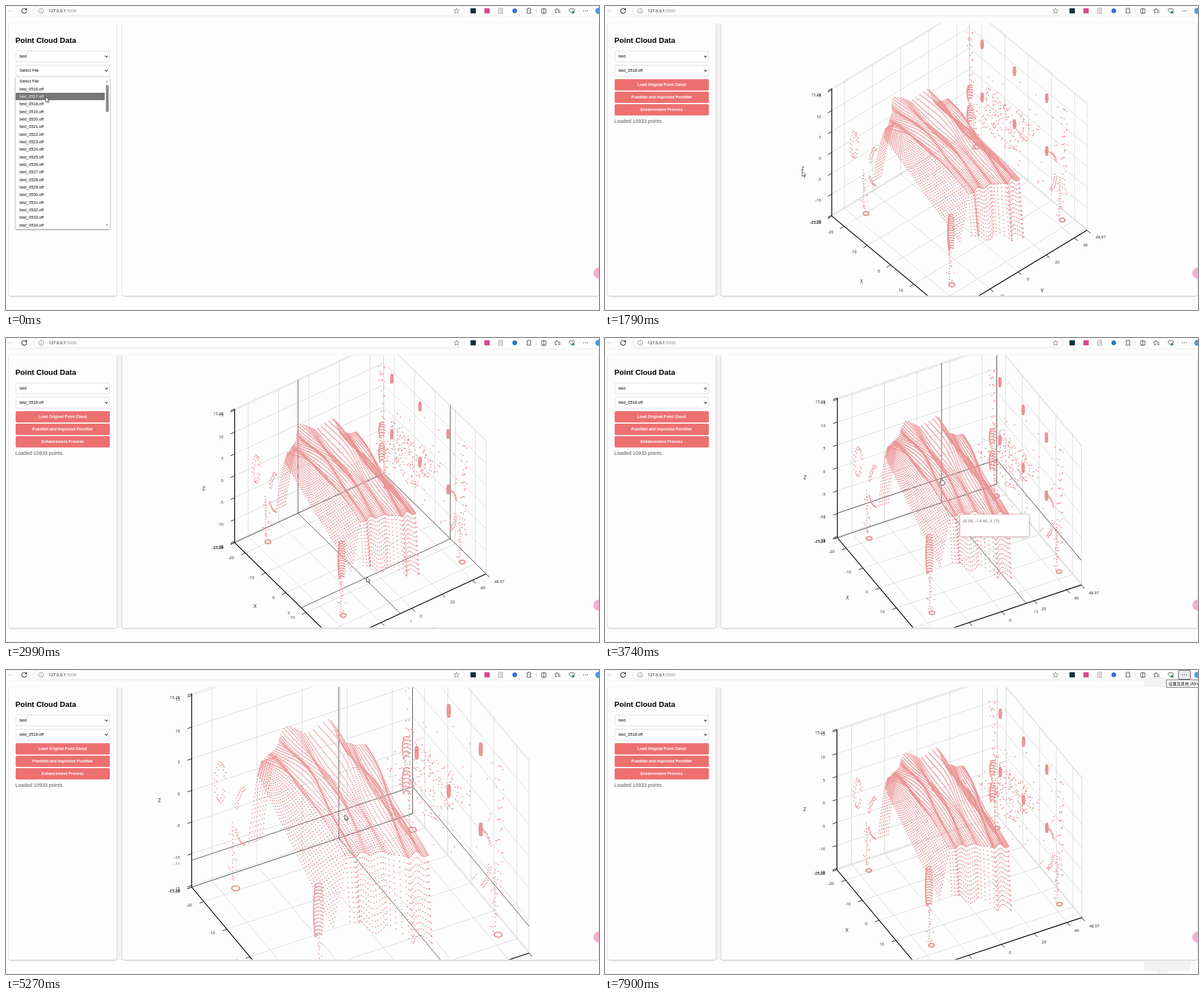
Write an HTML page with a canvas that moves like this. It is 1045 px wide and 536 px high and loops after 8.18 s.

```html
<!DOCTYPE html>
<html lang="en">
<head>
<meta charset="utf-8">
<title>Point Cloud Data</title>
<style>
html, body { margin: 0; width: 100%; height: 100%; overflow: hidden; background: #fdfdfd; }
body { position: relative; font: 7.25px "Liberation Sans", Arial, sans-serif; color: #000; }
body > *, #menu > * { position: absolute; box-sizing: border-box; }
#bar { left: 0; top: 0; }
.url { left: 75px; top: 2px; font: 7.25px/13px "Open Sans", sans-serif; }
.url span { color: #777; }
.panel { top: 30px; height: 481px; border-radius: 4px; background: #fdfdfd; box-shadow: 0 1px 3px rgba(0,0,0,.27); }
#gap { left: 195px; top: 30px; width: 10px; height: 481px; background: #f3f3f3; }
h2 { left: 16.5px; top: 52px; margin: 0; font-size: 13.3px; line-height: 17px; white-space: nowrap; }
.select { left: 16.5px; width: 166.5px; height: 19.5px; border: 1px solid #ddd; border-radius: 2px; padding-left: 6.5px; line-height: 18px; background: #fff; }
.select::after { content: ""; position: absolute; right: 3px; top: 5.5px; width: 3px; height: 3px; border: solid #111; border-width: 0 1.2px 1.2px 0; transform: rotate(45deg); }
.button { left: 16.5px; width: 166.5px; height: 19.5px; border-radius: 2.5px; background: #ed7071; color: #fff; text-align: center; font-weight: bold; font-size: 6.95px; line-height: 19.5px; }
.button.hover { background: #f1babb; }
#loaded { left: 16.5px; top: 197px; font-size: 8.89px; line-height: 12px; color: #555; }
#menu { left: 16.5px; top: 126px; width: 166.5px; height: 267px; background: #fff; box-shadow: 0 1px 3px rgba(0,0,0,.5); }
#menu div { left: 0; width: 157.5px; height: 13.3px; padding-left: 7.5px; line-height: 13.8px; }
#menu .on { background: #767676; color: #fff; }
#menu i { left: 159.5px; top: 13px; width: 5px; height: 48px; border-radius: 2.5px; background: #8b8b8b; }
#menu b { left: 159.5px; border: 2.5px solid transparent; }
#stage { left: 0; top: 0; }
#bubble { left: 1035px; top: 461px; width: 20px; height: 20px; border-radius: 50%; background: #f6aed0; }
.ghost { background: #f2f2f2; }
#hint { left: 989px; top: 17px; width: 70px; height: 14px; border: 1px solid #666; background: #fff; padding-left: 3px; font: 7.2px/12px "Noto Sans CJK SC", "Noto Sans CJK", sans-serif; white-space: nowrap; }
#dots { left: 1010px; top: 0; width: 22px; height: 17px; border: 1px solid #556; border-radius: 2px; background: #e9e9ec; }
#cursor { left: 0; top: 0; overflow: visible; }
</style>
</head>
<body>
<div id="dots"></div>
<svg id="bar" width="1045" height="22" fill="none" stroke="#333" stroke-width=".9">
  <path d="M0 19.5H1045" stroke="#ececec"/>
  <rect x="48.5" y="-.5" width="759" height="17.5" rx="8.7" stroke="#dcdcdc"/>
  <path d="M13 8.5H4M7.5 5L4 8.5L7.5 12" stroke="#ccc"/>
  <path d="M35.6 6.2A4.3 4.3 0 1 0 36.3 8.6M36.3 3.6V6.6H33.3" stroke-width="1.1"/>
  <circle cx="62" cy="8.5" r="4.3" stroke="#777"/><path d="M62 8V11M62 6V6.8" stroke="#777"/>
  <path d="M794 4l1.4 2.9 3.2.4-2.3 2.2.6 3.2-2.9-1.5-2.9 1.5.6-3.2-2.3-2.2 3.2-.4z" stroke="#777"/>
  <g stroke="none">
    <rect x="818.5" y="4" width="9.5" height="9" rx="1" fill="#123038"/>
    <rect x="843" y="4" width="9.5" height="9" rx="1" fill="#d9488b"/>
    <circle cx="896.5" cy="8.5" r="4.2" fill="#2b74d4"/>
    <circle cx="1044" cy="8.5" r="5.5" fill="#4a9ede"/>
  </g>
  <path d="M869 4h6v9h-7V5zM869.5 7h4.5M869.5 10h4.5" stroke="#888"/>
  <path d="M918 5h2.2a1.5 1.5 0 0 1 3 0h1.8v2.3a1.5 1.5 0 0 0 0 3V12.5H918V10.3a1.5 1.5 0 0 0 0-3z"/>
  <path d="M934.5 4V13" stroke="#ddd"/>
  <path d="M944 5h7.5v7.5H944zM947.8 3.5V14"/>
  <path d="M971 4l1.4 2.7 3 .4M971 4l-1.3 2.8-3 .4 2.2 2.1-.5 3.1 2.6-1.4M973 9h4M973 11.5h4"/>
  <path d="M997 12.5l-4-4a2.4 2.4 0 0 1 4-3 2.4 2.4 0 0 1 4 3z"/>
  <circle cx="999.5" cy="11" r="2.3" fill="#2e8b45" stroke="none"/>
  <path d="M1017.5 8.5h.1M1021 8.5h.1M1024.5 8.5h.1" stroke-width="1.5" stroke-linecap="round"/>
</svg>
<div class="url">127.0.0.1<span>:5000</span></div>
<div id="gap"></div>
<div class="panel" style="left:5px;width:189.5px"></div>
<div class="panel" style="left:204.5px;width:839px"></div>
<h2>Point Cloud Data</h2>
<div class="select" style="top:79.3px">bed</div>
<div class="select" style="top:104.2px" id="file">Select File</div>
<div class="button" style="top:129px" id="load">Load Original Point Cloud</div>
<div class="button" style="top:151.2px">PointNet and Improved PointNet</div>
<div class="button" style="top:173.3px">Enhancement Process</div>
<div id="loaded">Loaded 10933 points.</div>
<div id="menu"><i></i><b style="top:3.5px;border-bottom-color:#666"></b><b style="top:259px;border-top-color:#666"></b></div>
<canvas id="stage" width="1045" height="536"></canvas>
<div id="bubble"></div>
<div class="ghost late" style="left:950px;top:13px;width:40px;height:16px"></div>
<div class="ghost late" style="left:950px;top:514px;width:82px;height:17px"></div>
<div class="ghost late" style="left:973px;top:531px;width:18px;height:5px"></div>
<div id="hint" class="late">设置及其他 (Alt+F)</div>
<svg id="cursor" width="12" height="16" fill="#fff" stroke="#222" stroke-width=".8" stroke-linejoin="round">
  <path id="arrow" d="M0 0V9.5L2.2 7.5L3.7 10.8L5.2 10.1L3.7 7H6.6Z"/>
  <path id="hand" d="M-1 .8Q0-.6 1 .8V4.5L5.2 5.6Q6.2 6 6 7.5L5 12H-.5L-3.6 7.7Q-3.6 6.3-2.2 7L-1 8Z"/>
</svg>
<script>
const LOOP = 8180, CX = 624.5, CY = 270.5;
const REST = 319, LAG = 60;
const RANGE = { x: 50.52, y: 97.94, z: 30.56 };
const $ = id => document.getElementById(id);
const ctx = $('stage').getContext('2d');
const late = document.querySelectorAll('.late');
const mix = (a, b, k) => a + (b - a) * k;

const rows = ['Select File', ...Array.from({ length: 19 }, (_, i) => `bed_0${516 + i}.off`)].map((name, i) => {
  const row = document.createElement('div');
  row.textContent = name;
  row.style.top = i * 13.33 + .3 + 'px';
  return $('menu').appendChild(row);
});

// Values between rows of [key, ...values], linear.
function track(keys, t) {
  const i = keys.findIndex(k => k[0] > t);
  if (i < 0) return keys[keys.length - 1].slice(1);
  if (!i) return keys[0].slice(1);
  const a = keys[i - 1], b = keys[i], k = (t - a[0]) / (b[0] - a[0]);
  return a.slice(1).map((v, n) => mix(v, b[n + 1], k));
}

// start, interval, end of each stepped stretch
const STEPS = [[0, 150, 150], [550, 135, 820], [1250, 133, 2180], [2330, 137, 3290], [3440, 150, 4400],
  [4520, 120, 5390], [5700, 183, 6250], [6870, 147, 7900]];
function hold(t) {
  const [start, every, end] = STEPS.filter(s => s[0] <= t).pop();
  return t >= end ? end : start + Math.floor((t - start) / every) * every;
}
const MOUSE = [[0, 70, 160], [150, 71, 172], [550, 72, 172], [820, 92, 140], [1250, 92, 140], [1500, 200, 200],
  [2270, 603, 449], [2330, 603, 449], [3290, 660, 400], [3680, 593, 247], [3740, 593, 247], [4400, 597, 255],
  [5640, 597, 255], [6250, 669, 285], [6870, 690, 250], [7600, 1010, 20], [7900, 1021, 8]];
// time, size, turn, tilt
const VIEW = [[2330, 319, 49.5, 45.2], [3290, 318.5, 60, 40.2], [3440, 318, 62, 39.2], [4400, 318, 62, 39.2],
  [4520, 390, 62, 39.2], [4760, 550, 62.2, 39.2], [4880, 597, 62.2, 39.2], [5000, 560, 62.2, 39.2],
  [5360, 380, 62.2, 39.2], [5700, 372, 62.2, 39.2], [6060, 319.5, 62.2, 39.2]];

function makeCloud() {
  const cloud = [], add = (u, v, w) => cloud.push([u, v, w]);
  let seed = 17;
  const rnd = () => (seed = seed * 16807 % 2147483647) / 2147483647;
  const jit = r => (rnd() - .5) * 2 * r;
  const grid = (n, m, f) => {
    for (let i = 0; i < n; i++) for (let j = 0; j < m; j++) f(i / (n - 1), j / (m - 1));
  };
  // blanket edges: position, v and u and w at one side, v and w at the other
  const EDGE = [[0, -.31, -.25, .26, -.27, .2], [.2, -.2, -.34, .22, -.2, .2], [.38, -.12, -.42, .245, -.15, .19],
    [.5, -.07, -.33, .25, -.08, .15], [.6, 0, -.27, .34, -.01, .12], [.72, .07, -.28, .19, .03, .11],
    [1, .2, -.33, .08, .1, .08]];
  const top = (a, b) => {
    const [v0, u0, w0, v1, w1] = track(EDGE, a), arch = Math.sin(b * Math.PI);
    const fold = (Math.sin(a * 34 + b * 6) * .01 + Math.sin(a * 15 - b * 5) * .009) * (.35 + .65 * arch);
    return [mix(u0, .39 + .012 * Math.sin(a * 22), b), mix(v0, v1, b) + fold,
      mix(w0, w1, b) + .11 * (1 - a) ** 1.7 * arch + fold * 1.2];
  };
  grid(50, 72, (a, b) => add(...top(a, b)));
  grid(50, 15, (b, k) => {
    const [u, v, w] = top(0, b);
    add(u, mix(v, -.33, k), mix(w, .068 - .5 * u, k));
  });
  grid(36, 14, (a, k) => {
    const [u, v, w] = top(a, 1);
    add(u + .03 * k + .012 * Math.sin(a * 22) * k, v, mix(w, -.08 - .67 * (v + .3), k) + .02 * Math.sin(a * 16) * k);
  });
  grid(6, 26, (a, k) => add(mix(-.25, -.37, k), mix(-.31, -.25, a), .26 - .51 * k ** 1.5));

  // upright circle in the v-w plane, a few points thick
  const hoop = (c, n, rv, rw, from, to) => {
    for (let i = 0; i < n; i++) {
      const g = mix(from, to, i / (n - 1)) * Math.PI / 180;
      for (const d of [-.012, .004]) add(c[0] + d + jit(.004), c[1] + rv * Math.cos(g), c[2] + rw * Math.sin(g));
    }
  };
  const ring = (u, v, w, n, r, from = 0, to = 360) => {
    for (let i = 0; i < n; i++) {
      const g = mix(from, to, i / n) * Math.PI / 180;
      add(u + r * Math.cos(g), v + r * Math.sin(g), w);
    }
  };
  const stack = (u, v, w, height, radius, levels, to) => {
    for (let i = 0; i < levels; i++) {
      const k = i / (levels - 1) * 2 - 1;
      ring(u, v, w + k * height, 12, radius * (1 - .3 * k * k), 90, 90 + to);
    }
  };
  for (const [u, v, w] of [[-.347, -.382, -.44], [.365, -.366, -.465], [.377, .425, -.465], [-.35, .42, -.445]]) {
    ring(u, v, w, 36, .0155);
    for (let i = 0; i < 15; i++) {
      const h = w + .04 + i * .021;
      add(u - .01 + jit(.003), v - .008, h);
      if (i % 3 == 0) for (let j = 0; j < 3; j++) add(u + jit(.022), v - .01 + jit(.016), h + jit(.008));
    }
  }
  for (const u of [-.4, .4]) for (let i = 0; i < 13; i++) {
    const h = .42 - i * .055;
    for (let j = 0; j < 4; j++) if (rnd() < .75) add(u + jit(.016), .42 + jit(.014), h + jit(.008));
  }
  hoop([-.39, -.426, .09], 17, .022, .1, 10, 330);
  stack(.4, -.4, -.01, .13, .021, 15, 200);
  stack(-.4, .42, -.06, .05, .018, 6, 200);
  stack(-.4, .42, -.23, .06, .018, 7, 200);
  for (const [c, mid] of [[[-.261, -.381, -.006], 180], [[.351, .362, -.068], 0]])
    for (const s of [-1, 1]) hoop(c, 11, .045, .145, mid + 22 * s, mid + 85 * s);
  for (const u of [-.275, 0, .275]) for (const w of [.43, .015]) stack(u, .4, w, .029, .0065, 9, 360);
  // loose pillow points between four corners
  const L = [-.11, .16, .167], T = [-.055, .268, .351], R = [.256, .374, .19], B = [.197, .217, .047];
  for (let i = 0; i < 200; i++) {
    const a = rnd(), b = rnd();
    add(...L.map((_, n) => mix(mix(L[n], T[n], a), mix(B[n], R[n], a), b) + jit(.012)));
  }
  for (let i = 0; i < 34; i++) add(jit(.38), .4 + jit(.02), jit(.42));
  return cloud;
}
const cloud = makeCloud();

function drawChart(t) {
  const [size, turn, tilt] = track(VIEW, t), rad = Math.PI / 180;
  const cos = Math.cos(turn * rad), sin = Math.sin(turn * rad);
  const s = Math.sin(tilt * rad), c = Math.cos(tilt * rad);
  const at = (u, v, w) => [CX + size * (u * cos + v * sin), CY + size * ((u * sin - v * cos) * s - w * c)];
  const line = (p, q, color, width) => {
    ctx.strokeStyle = color;
    ctx.lineWidth = width;
    ctx.beginPath();
    ctx.moveTo(...at(...p));
    ctx.lineTo(...at(...q));
    ctx.stroke();
  };
  const planes = (axis, k, color, width) => {
    if (axis == 'x') {
      line([k, -.5, -.5], [k, .5, -.5], color, width);
      line([k, .5, -.5], [k, .5, .5], color, width);
    } else if (axis == 'y') {
      line([-.5, k, -.5], [.5, k, -.5], color, width);
      line([-.5, k, -.5], [-.5, k, .5], color, width);
    } else {
      line([-.5, -.5, k], [-.5, .5, k], color, width);
      line([-.5, .5, k], [.5, .5, k], color, width);
    }
  };
  const unit = (x, y) => [x / Math.hypot(x, y), y / Math.hypot(x, y)];
  const back = unit(-sin, cos * s), right = unit(cos, sin * s);
  const foot = (axis, k) => axis == 'x' ? at(k, -.5, -.5) : axis == 'y' ? at(.5, k, -.5) : at(-.5, -.5, k);
  const label = (axis, k, text, color) => {
    const [x, y] = foot(axis, k), d = axis == 'y' ? right : back, far = axis == 'y' ? 20 : 22;
    ctx.fillStyle = color;
    ctx.textAlign = axis == 'y' ? 'left' : 'right';
    ctx.fillText(text, x + d[0] * far, y + d[1] * far);
  };

  ctx.save();
  ctx.beginPath();
  ctx.rect(205, 30.5, 839, 480);
  ctx.clip();
  ctx.font = '7px "Open Sans", sans-serif';
  ctx.textBaseline = 'middle';
  const ticks = { x: [-20, -10, 0, 10, 20], y: [-40, -20, 0, 20, 40], z: [-15, -10, -5, 0, 5, 10, 15] };
  const ends = { x: 25.26, y: 48.97, z: 15.28 };
  for (const axis in ticks)
    for (const v of [-ends[axis], ...ticks[axis], ends[axis]]) planes(axis, v / RANGE[axis], '#cfcfcf', .8);

  // the pointer lies on the back face under the mouse; it trails a little and ignores zooming
  const [mx, my] = track(MOUSE, t - LAG);
  const a = (mx - CX) / REST, b = (my - CY) / REST, k = (b - .5 * c) / s;
  const hits = [
    [a * cos + k * sin, a * sin - k * cos, -.5],
    [-.5, (a + .5 * cos) / sin, 0],
    [(a - .5 * sin) / cos, .5, 0]
  ];
  for (const h of hits.slice(1)) h[2] = ((h[0] * sin - h[1] * cos) * s - b) / c;
  const hit = hits.find(h => h.every(v => Math.abs(v) <= .5001));
  if (hit) ['x', 'y', 'z'].forEach((axis, i) => {
    planes(axis, hit[i], '#333', .9);
    label(axis, hit[i], Math.round(hit[i] * RANGE[axis]), '#555');
  });

  ctx.fillStyle = '#ea9495';
  for (const p of cloud) {
    const [x, y] = at(...p);
    ctx.fillRect(x - .95, y - .95, 1.9, 1.9);
  }

  line([-.5, -.5, -.5], [-.5, -.5, .5], '#000', 1.4);
  line([-.5, -.5, -.5], [.5, -.5, -.5], '#000', 1.4);
  line([.5, -.5, -.5], [.5, .5, -.5], '#000', 1.4);
  for (const axis in ticks) for (const v of [-ends[axis], ...ticks[axis], ends[axis]]) {
    const [x, y] = foot(axis, v / RANGE[axis]), d = axis == 'y' ? right : back;
    ctx.strokeStyle = '#111';
    ctx.lineWidth = 1;
    ctx.beginPath();
    ctx.moveTo(x, y);
    ctx.lineTo(x + d[0] * 8, y + d[1] * 8);
    ctx.stroke();
    label(axis, v / RANGE[axis], v, '#222');
  }
  ctx.font = '9px "Open Sans", sans-serif';
  ctx.textAlign = 'center';
  for (const axis in ticks) {
    const [x, y] = foot(axis, 0), d = axis == 'y' ? right : back, far = axis == 'y' ? 55 : 60;
    ctx.fillText(axis.toUpperCase(), x + d[0] * far, y + d[1] * far - 1);
  }
  if (t >= 3740 && t < 3890) drawTip(mx + 32.5, my + 64);
  ctx.restore();
}

function drawTip(x, y) {
  ctx.save();
  ctx.shadowColor = 'rgba(0,0,0,.25)';
  ctx.shadowBlur = 5;
  ctx.shadowOffsetY = 1;
  ctx.fillStyle = '#fff';
  ctx.beginPath();
  ctx.roundRect(x, y, 122, 39, 2);
  ctx.fill();
  ctx.restore();
  ctx.strokeStyle = '#eba3a4';
  ctx.lineWidth = .8;
  ctx.stroke();
  ctx.fillStyle = '#666';
  ctx.textAlign = 'left';
  ctx.font = '7.6px "Open Sans", sans-serif';
  ctx.fillText('(8.08, -14.46, 3.15)', x + 5.5, y + 12);
}

const show = (el, on) => { el.style.visibility = on ? 'visible' : 'hidden'; };
let shown = -1;
function frame(now) {
  const t = hold(now % LOOP);
  if (t !== shown) {
    shown = t;
    const [mx, my] = track(MOUSE, t), open = t < 550, loaded = t >= 1600;
    show($('menu'), open);
    rows.forEach((row, i) => { row.className = i == (t < 150 ? 2 : 3) ? 'on' : ''; });
    $('file').textContent = open ? 'Select File' : 'bed_0518.off';
    const hover = t >= 820 && t < 1380;
    $('load').className = hover ? 'button hover' : 'button';
    show($('loaded'), loaded);
    show($('gap'), loaded);
    late.forEach(el => show(el, t >= 7890));
    show($('dots'), t >= 7740);
    const hand = hover || (t >= 3740 && t < 3890);
    show($('arrow'), !hand && t < 7890);
    show($('hand'), hand);
    $('cursor').style.transform = `translate(${mx}px, ${my}px)`;
    ctx.clearRect(0, 0, 1045, 536);
    if (loaded) drawChart(t);
  }
  requestAnimationFrame(frame);
}
requestAnimationFrame(frame);
</script>
</body>
</html>
```
